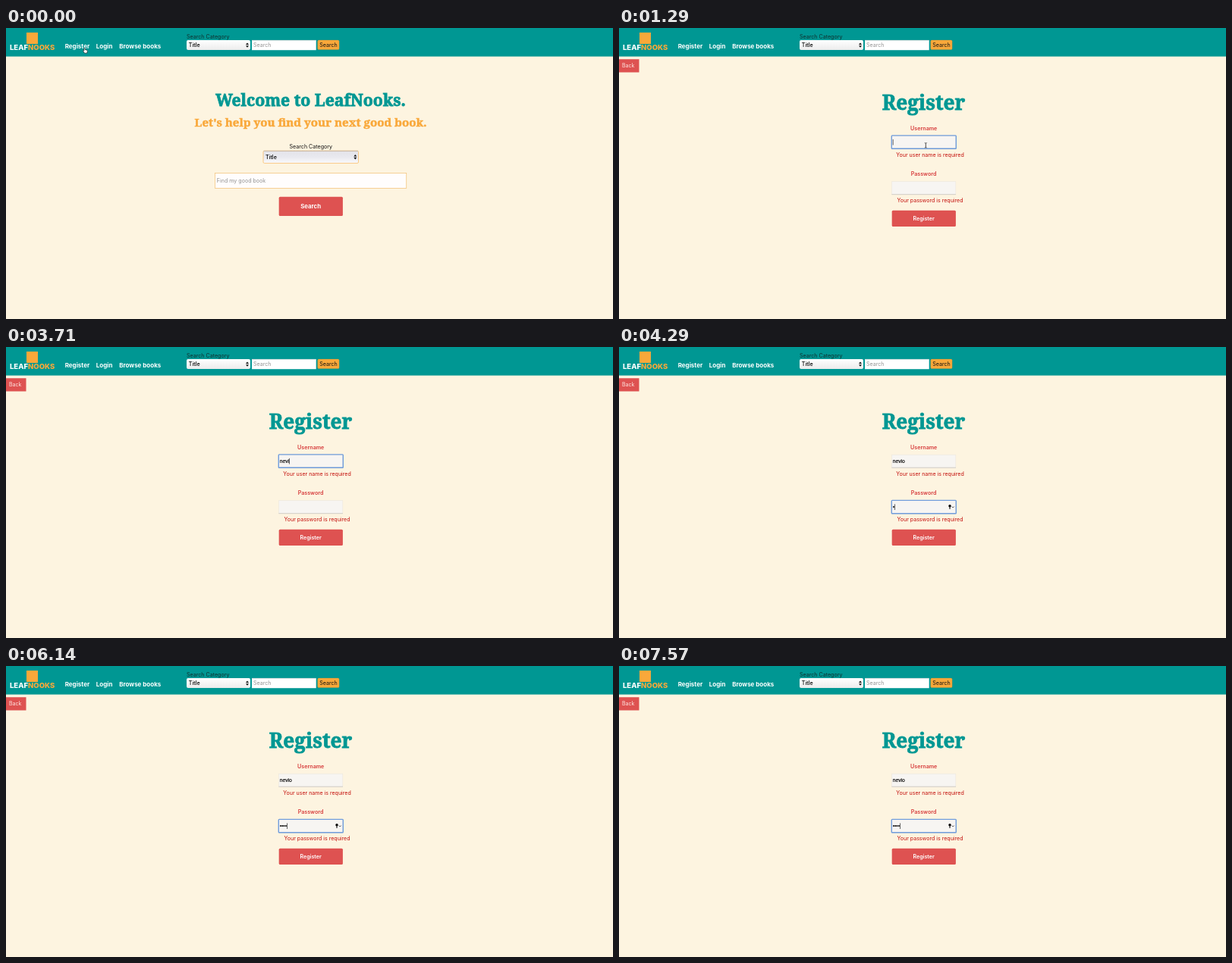
Recreate the animation shown at these times as an HTML page. Size 800 by 384 pixels, loop 8 s.

```html
<!DOCTYPE html>
<html lang="en">
<head>
<meta charset="utf-8">
<title>LeafNooks</title>
<style>
  html, body { margin: 0; width: 100%; height: 100%; overflow: hidden; background: #fdf4e0; }
  svg { display: block; width: 100%; height: 100%; }
  text { font: 7.1px Inter, sans-serif; fill: #111; white-space: pre; }
  .nav { font-size: 8px; font-weight: 700; fill: #fff; }
  .brand { font-size: 9.5px; font-weight: 800; fill: #fff; }
  .mid { text-anchor: middle; }
  .pick { font-weight: 500; fill: #000; }
  .slab { font-family: "Noto Serif", serif; font-weight: 700; text-anchor: middle; stroke-width: .8px; }
  .teal { fill: #009793; stroke: #009793; }
  .gold { fill: #f9a83a; stroke: #f9a83a; stroke-width: .5px; }
  .hint { fill: #929292; }
  .label { font-weight: 600; fill: #d63b3b; text-anchor: middle; }
  .error { font-size: 7.05px; fill: #c4100c; text-anchor: middle; }
  .typed { font: 6.7px "Liberation Sans", Arial, sans-serif; fill: #000; stroke: #000; stroke-width: .15px; }
  .red { fill: #de5251; }
</style>
</head>
<body>
<svg viewBox="0 0 800 384" preserveAspectRatio="none">
  <defs>
    <linearGradient id="pale" x2="0" y2="1">
      <stop offset="0" stop-color="#fff"/><stop offset="1" stop-color="#ececec"/>
    </linearGradient>
    <linearGradient id="cool" x2="0" y2="1">
      <stop offset="0" stop-color="#e4e4ea"/><stop offset=".5" stop-color="#e9e9ef"/><stop offset="1" stop-color="#fafafc"/>
    </linearGradient>
    <path id="arrows" d="M-2 -.6L0 -3.2L2 -.6ZM-2 .6L0 3.2L2 .6Z" fill="#111"/>
  </defs>

  <rect width="800" height="384" fill="#fdf4e0"/>

  <g id="header">
    <rect width="800" height="37.6" fill="#009793"/>
    <rect x="27" y="6" width="15" height="15" fill="#f9a83a"/>
    <text class="brand" x="5" y="28.6">LEAF<tspan fill="#f9a83a">NOOKS</tspan></text>
    <text class="nav" x="77.7" y="26.7">Register</text>
    <text class="nav" x="118.8" y="26.7">Login</text>
    <text class="nav" x="149.2" y="26.7">Browse books</text>
    <text x="238" y="13.6" style="fill:#10302f">Search Category</text>
    <rect x="238" y="16" width="84" height="13" rx="2" fill="url(#pale)"/>
    <text class="pick" x="240.8" y="25.1">Title</text>
    <use href="#arrows" x="318" y="22.6"/>
    <rect x="324" y="16" width="84.7" height="13.2" fill="#fff"/>
    <path d="M324 16.3h84.7" stroke="#b4c4c2" stroke-width=".6"/>
    <text class="hint" x="326" y="25.2">Search</text>
    <rect x="410.7" y="16" width="28.4" height="12.6" rx="1.5" fill="#f9a83a" stroke="#c78b35" stroke-width=".3"/>
    <text class="mid" x="425" y="24.7">Search</text>
  </g>

  <g id="home">
    <text class="slab teal" x="401.5" y="103.4" style="font-size:21.2px">Welcome to LeafNooks.</text>
    <text class="slab gold" x="401.5" y="130" style="font-size:15.1px">Let's help you find your next good book.</text>
    <text class="mid" x="401.8" y="159">Search Category</text>
    <rect x="339" y="162.2" width="125.5" height="16.2" rx="1.5" fill="url(#cool)" stroke="#f9bd6a" stroke-width=".8"/>
    <path d="M339.5 162.3H464" stroke="#b0b0b4" stroke-width=".7"/>
    <text class="pick" x="342" y="172.6">Title</text>
    <use href="#arrows" x="460.3" y="170.2"/>
    <rect x="275.5" y="191.4" width="252.2" height="20.1" fill="#fffdfd" stroke="#f4c680" stroke-width=".8"/>
    <text class="hint" x="277.8" y="204.1">Find my good book</text>
    <rect class="red" x="359.7" y="222.8" width="84.2" height="25.2" rx="1.5"/>
    <text class="mid" x="401.6" y="238.2" style="fill:#fff;font-size:7.8px;font-weight:700">Search</text>
  </g>

  <g id="form">
    <rect class="red" y="41.2" width="26.5" height="17.3"/>
    <text x="4" y="52.4" style="fill:#ffe9e4;font-size:7px">Back</text>
    <text class="slab teal" x="401.5" y="108" style="font-size:26.2px">Register</text>
    <text class="label" x="401.7" y="134.6">Username</text>
    <g id="user"></g>
    <text class="error" x="410" y="170">Your user name is required</text>
    <text class="label" x="401.5" y="195.1">Password</text>
    <g id="pass"></g>
    <g id="key">
      <circle cx="436" cy="209.8" r="1.7"/>
      <path d="M435.5 210h1v4h-1z"/>
      <path d="M438.8 210.6l1.4 1.4l1.4 -1.4" fill="none" stroke="#222" stroke-width=".8"/>
    </g>
    <text class="error" x="410" y="230.4">Your password is required</text>
    <rect class="red" x="359.7" y="240.7" width="84.2" height="21.2" rx="1.5"/>
    <text class="mid" x="401.6" y="253.7" style="fill:#fff;font-weight:600">Register</text>
  </g>

  <g id="hand">
    <path d="M-1.6 -3.4q.8 -.8 1.4 0v2l2.6 .7q.6 .4 .4 1.6l-.6 2.3h-3.2l-2 -3q.2 -1 1.4 -.2z" fill="#fff" stroke="#222" stroke-width=".7"/>
  </g>
  <g id="arrow">
    <path d="M0 0V6.4L1.6 5L2.7 7.4L3.8 6.9L2.7 4.6H4.7Z" fill="#111" stroke="#fff" stroke-width=".5"/>
  </g>
  <g id="beam">
    <path d="M-1.4 -3.2q1.2 0 1.4 .7q.2 -.7 1.4 -.7M0 -2.5V2.5M-1.4 3.2q1.2 0 1.4 -.7q.2 .7 1.4 .7" fill="none" stroke="#222" stroke-width=".8"/>
  </g>
</svg>
<script>
const LOOP = 8000;
const NAME = "nevio";
const $ = id => document.getElementById(id);
const show = (node, on) => { node.style.display = on ? "" : "none"; };

// [time, value] steps, each held until the next
const nameSteps = [[0, 0], [2000, 1], [2140, 2], [2290, 3], [2430, 4], [2570, 5], [3710, 4], [3860, 5]];
const dotSteps = [[0, 0], [4290, 1], [4710, 3], [4860, 4], [5000, 5], [6000, 4]];
const focusSteps = [[0, ""], [1140, "user"], [4140, "pass"]];
const pageSteps = [[0, "home"], [290, "form"]];
const pointerSteps = [[0, "hand"], [430, "arrow"], [1140, "beam"], [2000, ""]];
const moveTimes = [430, 570, 710, 860, 1000, 1140];

const at = (steps, t) => steps.reduce((value, [time, next]) => t >= time ? next : value, steps[0][1]);

function makeField(id, y) {
  const group = $(id);
  group.innerHTML = `
    <rect x="359.6" y="${y}" width="84.2" height="17" fill="#f7f5f2" stroke="#ebe7dd" stroke-width=".6"/>
    <path d="M359.4 ${y + 17}h84.6" stroke="#c9c6bf" stroke-width=".8"/>
    <rect x="359.3" y="${y - .3}" width="85" height="17.4" rx=".8" fill="none" stroke="#709ddc" stroke-width="1.4"/>
    <text class="typed" x="360.7" y="${y + 10.7}"></text>
    <path d="M0 ${y + 4.7}v7.6" stroke="#222" stroke-width=".7"/>`;
  const [, , ring, text, caret] = group.children;
  return (value, focused) => {
    if (text.textContent !== value) text.textContent = value;
    const end = value ? text.getComputedTextLength() : 0;
    caret.setAttribute("transform", `translate(${361.2 + end} 0)`);
    show(ring, focused);
    show(caret, focused);
  };
}

const setUser = makeField("user", 142.2);
const setPass = makeField("pass", 202.7);

function pointerPlace(t) {
  const u = moveTimes.filter(m => t >= m).length / moveTimes.length;
  const k = u * u * (3 - 2 * u);
  return [104.5 + 299.8 * k, 30 + 124.8 * k];
}

function draw(t) {
  const page = at(pageSteps, t);
  const focus = at(focusSteps, t);
  const pointer = at(pointerSteps, t);
  const [x, y] = pointerPlace(t);
  show($("home"), page === "home");
  show($("form"), page === "form");
  if (page === "form") {
    setUser(NAME.slice(0, at(nameSteps, t)), focus === "user");
    setPass("•".repeat(at(dotSteps, t)), focus === "pass");
    show($("key"), focus === "pass");
  }
  for (const id of ["hand", "arrow", "beam"]) {
    show($(id), id === pointer);
    $(id).setAttribute("transform", `translate(${x} ${y})`);
  }
}

const start = performance.now();
function tick() {
  draw((performance.now() - start) % LOOP);
  requestAnimationFrame(tick);
}
tick();
</script>
</body>
</html>
```
